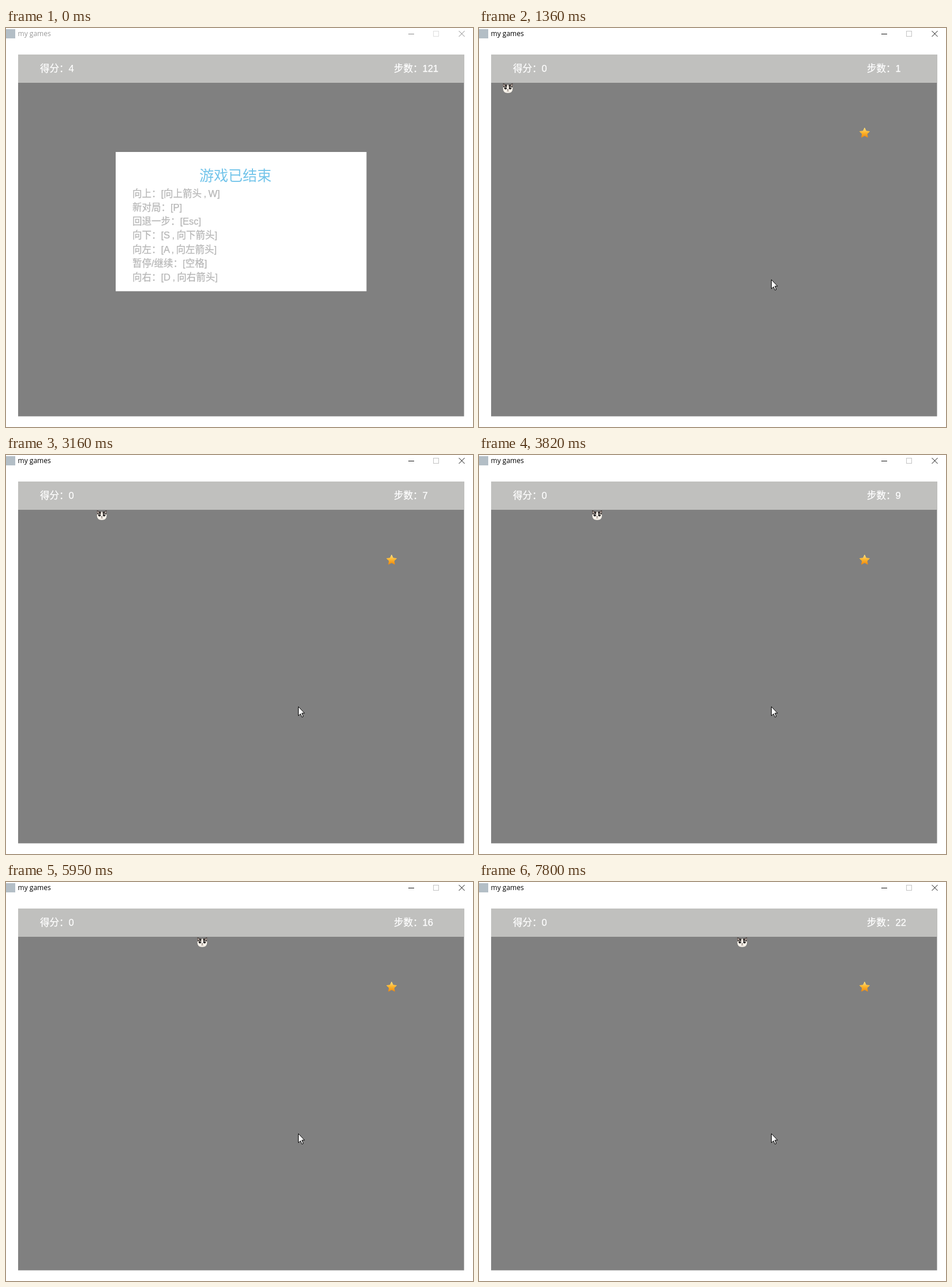
Recreate the animation shown at these times as an HTML page. Size 809 by 692 pixels, loop 8000 ms.

```html
<!DOCTYPE html>
<html lang="zh-CN">
<head>
<meta charset="utf-8">
<title>my games</title>
<style>
  html, body { margin: 0; width: 100%; height: 100%; overflow: hidden; background: #fff; }
  svg { display: block; }
  text { font: 16.5px "Liberation Sans", "Noto Sans CJK SC", "Noto Sans CJK", sans-serif; white-space: pre; }
  .score { fill: #fff; stroke: #fff; stroke-width: .25; }
  .keys { fill: #b6b6b6; stroke: #b6b6b6; stroke-width: .25; word-spacing: -1.2px; }
  #caption { font: 12px "Open Sans", "Noto Sans", sans-serif; }
  .heading { font-size: 25px; fill: #72c4ea; }
</style>
</head>
<body>
<svg width="809" height="692" viewBox="0 0 809 692">
  <defs>
    <linearGradient id="gold" x1="0" y1="0" x2="0" y2="1">
      <stop offset="0" stop-color="#ffe083"/>
      <stop offset=".5" stop-color="#fdb52c"/>
      <stop offset="1" stop-color="#ee8a12"/>
    </linearGradient>
  </defs>

  <rect width="809" height="692" fill="#fff"/>
  <rect x="0" y="2" width="16" height="16" fill="#b3bec6"/>
  <text id="caption" x="20.5" y="14">my games</text>
  <g fill="none">
    <path id="controls" d="M697 10.5h10M784.5 5l10 10m0-10l-10 10"/>
    <rect id="maximise" x="740.5" y="5.5" width="9" height="9"/>
  </g>

  <rect x="21" y="46" width="772.5" height="627.5" fill="#808080"/>
  <rect x="21" y="46" width="772.5" height="49" fill="#c0c0be"/>
  <text class="score" id="points" x="59" y="76"></text>
  <text class="score" id="steps" x="672" y="76"></text>

  <g id="panel">
    <rect x="190" y="215" width="434.5" height="241.5" fill="#fff"/>
    <text class="heading" x="335" y="264.5">游戏已结束</text>
  </g>

  <g id="game">
    <path id="star" fill="url(#gold)" stroke="url(#gold)" stroke-width="1" stroke-linejoin="round"/>
    <g id="cat">
      <path d="M-8.7-8.6L-3.6-5.6H3.6L8.7-8.6L8.4 0Q8.8 8.7 0 8.7T-8.4 0Z" fill="#f7f2ea"/>
      <path d="M-8.7-8.6L-3.6-5.8L-1.2-6L-1.8-1.5L-5-2.8L-8.2-.6ZM8.7-8.6L3.6-5.8L1.2-6L1.8-1.5L5-2.8L8.2-.6Z" fill="#37312f"/>
      <path d="M-7.5-6.6L-4.7-4.8L-7.2-2.8ZM7.5-6.6L4.7-4.8L7.2-2.8Z" fill="#e6d2ca"/>
      <circle cx="-4" cy=".2" r="2.2" fill="#1d1a19"/>
      <circle cx="4" cy=".2" r="2.2" fill="#1d1a19"/>
      <circle cx="-3.5" cy="-.5" r=".7" fill="#fff"/>
      <circle cx="4.5" cy="-.5" r=".7" fill="#fff"/>
      <path d="M-1.5 2.6H1.5L0 4.2Z" fill="#4a3836"/>
      <path d="M0 4v1.2M-1.8 5.4Q0 6.4 1.8 5.4" fill="none" stroke="#8d7b73" stroke-width=".7"/>
    </g>
  </g>

  <path id="cursor" d="M.5.5V16.2L4.1 12.8L6.7 18.6L9 17.6L6.5 11.8H11.2Z" fill="#fff" stroke="#000"/>
</svg>
<script>
const LOOP = 8000;
const ACTIVE_AT = 1020;
const MOVES = [1360, 1690, 2020, 2280, 2610, 2880, 3160, 3490, 3820, 4160, 4420,
               4750, 5020, 5350, 5680, 5950, 6280, 6610, 6870, 7210, 7470, 7800];
const KEYS = ['向上：[向上箭头 , W]', '新对局：[P]', '回退一步：[Esc]', '向下：[S , 向下箭头]',
              '向左：[A , 向左箭头]', '暂停/继续：[空格]', '向右：[D , 向右箭头]'];

const el = id => document.getElementById(id);
const set = (id, name, value) => el(id).setAttribute(name, value);
const show = (id, on) => set(id, 'visibility', on ? 'visible' : 'hidden');
const moveTo = (id, x, y) => set(id, 'transform', `translate(${x} ${y})`);

function addKeyHelp() {
  KEYS.forEach((label, i) => {
    const line = document.createElementNS('http://www.w3.org/2000/svg', 'text');
    line.setAttribute('class', 'keys');
    line.setAttribute('x', 219);
    line.setAttribute('y', 293 + 24.15 * i);
    line.textContent = label;
    el('panel').append(line);
  });
}

function starPoints(cx, cy, outer, inner) {
  return Array.from({ length: 10 }, (_, i) => {
    const r = i % 2 ? inner : outer, a = i * Math.PI / 5;
    return [cx + r * Math.sin(a), cy - r * Math.cos(a)].map(v => v.toFixed(2));
  });
}

function drawCursor(t) {
  const hop = Math.min(4, Math.floor((t - 70) / 70));
  const left = Math.pow(1 - Math.max(0, hop) / 4, 1.4);
  show('cursor', t >= 70);
  moveTo('cursor', Math.round(506 + 236 * left), Math.round(436 + 219 * left));
}

function draw(t) {
  const step = MOVES.filter(m => m <= t).length;
  const active = t >= ACTIVE_AT;
  set('caption', 'fill', active ? '#000' : '#999');
  set('controls', 'stroke', active ? '#111' : '#888');
  set('maximise', 'stroke', active ? '#c4c4c4' : '#dedede');
  el('points').textContent = '得分：' + (step ? 0 : 4);
  el('steps').textContent = '步数：' + (step || 121);
  show('panel', !step);
  show('game', step);
  moveTo('cat', 50 + 19.33 * (step - 1), 104);
  drawCursor(t);
}

addKeyHelp();
set('star', 'd', 'M' + starPoints(668, 182.3, 9, 4.4).join('L') + 'Z');

const start = performance.now();
function tick() {
  draw((performance.now() - start) % LOOP);
  requestAnimationFrame(tick);
}
tick();
</script>
</body>
</html>
```
